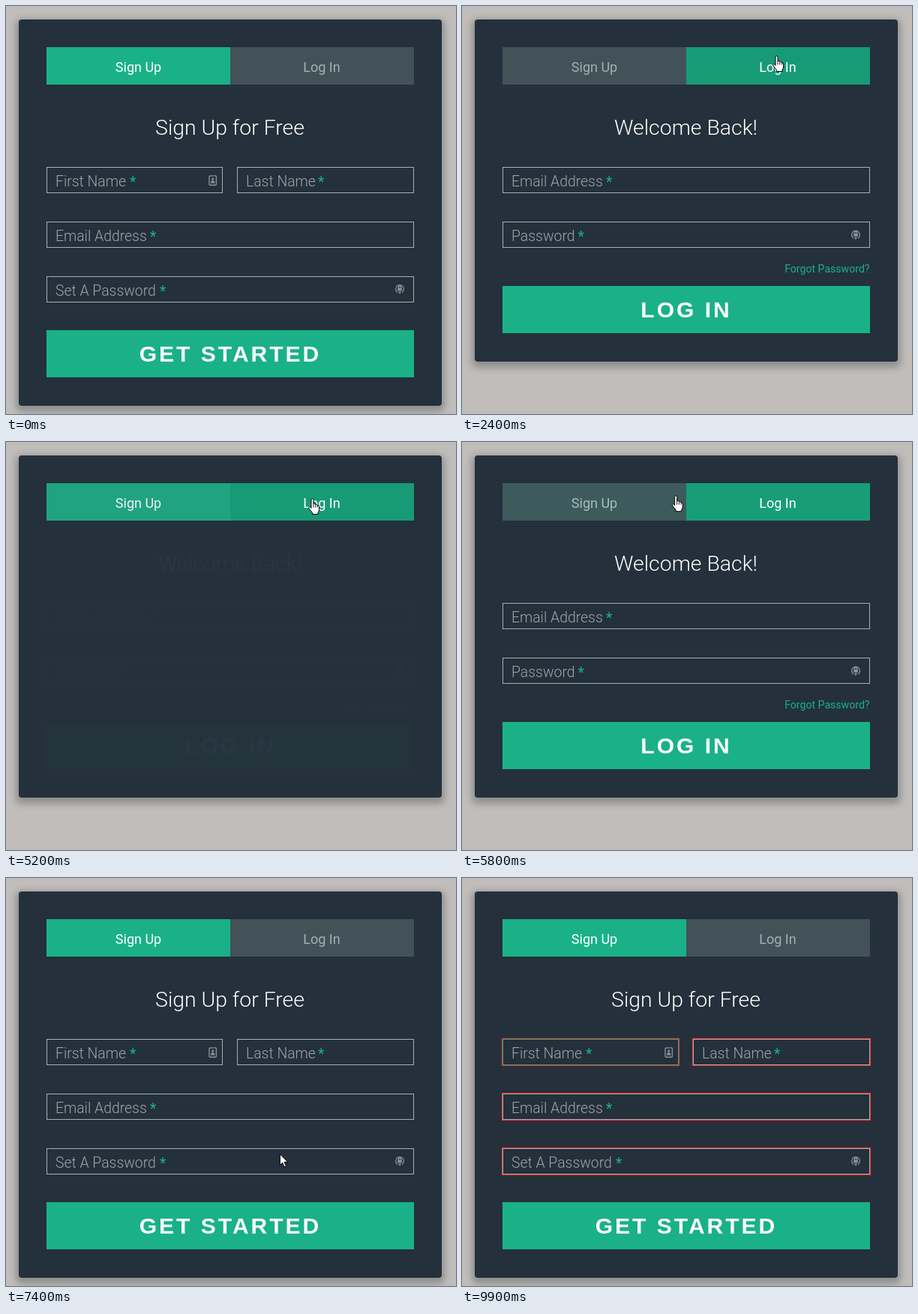
Animation, 600 px wide and 545 px high, one loop 10000 ms. Source, as an HTML page:

```html
<!DOCTYPE html>
<html lang="en">
<head>
<meta charset="utf-8">
<title>Sign up / log in form</title>
<style>
  html, body { margin: 0; width: 100%; height: 100%; overflow: hidden; background: #c1bdba; }
  #card {
    position: absolute; left: 17px; top: 18px; width: 564px; height: 516px;
    border-radius: 4px; background: #24303b;
    box-shadow: 0 4px 10px 4px rgba(19, 35, 47, .3);
  }
  svg { position: absolute; left: 0; top: 0; width: 600px; height: 545px; }
  text { font-family: Roboto, sans-serif; white-space: pre; }
  .mid { text-anchor: middle; }
  .tab { font-size: 18px; }
  .title { font-size: 28.4px; font-weight: 300; fill: #fff; }
  .label { font-size: 19.4px; font-weight: 300; fill: rgba(255, 255, 255, .56); }
  .star { font-size: 19.4px; fill: #1ab188; }
  .box { fill: none; stroke: #a0b3b0; }
  .glow { fill: none; stroke: #e83535; }
  .halo { fill: none; stroke: #f00; stroke-opacity: .2; }
  .btn { font: bold 30px "Liberation Sans", Arial, sans-serif; letter-spacing: 3px; fill: #fff; }
  .link { font-size: 14.1px; fill: #1ab188; text-anchor: end; }
  .tip { font: 10.7px "Open Sans", sans-serif; fill: #000; }
  .icon { fill: none; stroke: #87919a; stroke-width: 1.4; }
  .icon .solid { fill: #87919a; stroke: none; }
  .cursor { fill: #fff; stroke: #000; stroke-linejoin: round; }
</style>
</head>
<body>
<div id="card"></div>
<svg viewBox="0 0 600 545">
  <defs>
    <g id="lock" class="icon">
      <path d="M-3 5.2A5.4 5.4 0 1 1 3 5.2M-1.5 -1V-2.2A1.5 1.5 0 0 1 1.5 -2.2V-1"/>
      <path class="solid" d="M-2.8 -1.2H2.8V3H-2.8ZM-2 4H2L0 7.4Z"/>
    </g>
  </defs>
  <rect id="signBg" x="54" y="55" width="245" height="50"/>
  <rect id="logBg" x="299" y="55" width="245" height="50"/>
  <text id="signText" class="tab mid" x="176.5" y="87.5">Sign Up</text>
  <text id="logText" class="tab mid" x="421" y="87.5">Log In</text>

  <g id="signup">
    <text class="title mid" x="298.5" y="172">Sign Up for Free</text>
    <g id="signFields"></g>
    <g class="icon" transform="translate(270 226)">
      <rect x="1" y=".9" width="9.4" height="12.4" rx="1"/>
      <circle class="solid" cx="5.7" cy="5.1" r="1.7"/>
      <path class="solid" d="M3 9.4Q3 7.2 5.7 7.2T8.4 9.4V10.8H3Z"/>
    </g>
    <use href="#lock" x="525" y="377.5"/>
    <rect id="signBtn" x="54" y="433" width="490" height="63"/>
    <text class="btn mid" x="299" y="474.5">GET STARTED</text>
  </g>

  <g id="login">
    <text class="title mid" x="298.5" y="172">Welcome Back!</text>
    <g id="logFields"></g>
    <use href="#lock" x="525" y="305"/>
    <text class="link" x="543.5" y="356">Forgot Password?</text>
    <rect x="54" y="374" width="490" height="63" fill="#1ab188"/>
    <text class="btn mid" x="299" y="415.5">LOG IN</text>
  </g>

  <g id="tip">
    <path fill="#fff" d="M39 258H46L54 250.5L62 258H183V298H39Z"/>
    <text class="tip" x="54" y="281">Please fill out this field.</text>
  </g>

  <g id="hand" class="cursor">
    <path d="M-1.5 2.2Q-1.5 .6 0 .6T1.5 2.2V8Q1.9 7.2 3.1 7.4T4.3 8.8Q4.9 8 5.9 8.4T6.9 9.8Q9.1 9.2 9.1 11.5V15Q8.9 17.5 7.5 19.5V21.5H0V19.5Q-2.5 16.5 -4.5 13.6Q-5.3 12 -4.1 11.6Q-2.7 11.4 -1.5 13.4Z"/>
    <path d="M1.5 8V12.5M4.3 9V12.5M6.9 10V12.5" stroke-width=".9"/>
  </g>
  <path id="arrow" class="cursor" d="M.5 .5V15.2L3.9 12L6.2 17.5L8.6 16.5L6.3 11.2H11Z"/>
</svg>
<script>
const $ = id => document.getElementById(id);
const LOOP = 10000, STEP = 100;
const IDLE = [67, 81, 89], ACTIVE = [26, 177, 136], HOVER = [23, 155, 119];
const GREY = [160, 179, 176], WHITE = [255, 255, 255];

// Clicks on the tabs, and the submit that marks the fields
const CLICKS = [[1660, 'login'], [3846, 'signup'], [5135, 'login'], [6170, 'signup']];
const SUBMIT = 8450, TIP_END = 9400;

// Each entry: start of a half-second colour transition, new colour
const signTab = [[-999, ACTIVE], [1660, IDLE], [2780, HOVER], [4660, ACTIVE],
                 [5135, IDLE], [5740, HOVER], [6850, ACTIVE]];
const logTab = [[-999, IDLE], [560, HOVER], [2780, ACTIVE], [3846, IDLE],
                [4660, HOVER], [5740, ACTIVE], [6170, IDLE]];
const button = [[-999, ACTIVE], [7840, HOVER], [9300, ACTIVE]];

// Pointer tip: time, x, y
const path = [[100, 590, 190], [560, 475, 92], [1200, 419.5, 66], [2600, 419.5, 66],
  [3300, 209.5, 59], [4400, 209.5, 59], [5000, 408.5, 75], [5450, 408.5, 75],
  [6050, 212.5, 69], [6700, 212.5, 69], [7600, 385, 408], [7800, 385, 408],
  [8100, 357, 470], [9150, 357, 470], [9500, 340, 560]];

const clamp = v => Math.max(0, Math.min(1, v));
const mix = (a, b, k) => a + (b - a) * k;
const swing = k => .5 - Math.cos(Math.PI * clamp(k)) / 2;

// CSS "ease": cubic-bezier(.25, .1, .25, 1)
function ease(x) {
  let lo = 0, hi = 1, s = .5;
  for (let i = 0; i < 20; i++) {
    s = (lo + hi) / 2;
    const bx = .75 * s * (1 - s) + s ** 3;
    if (bx < x) lo = s; else hi = s;
  }
  return .3 * s * (1 - s) ** 2 + 3 * s * s * (1 - s) + s ** 3;
}

function colour(track, t, map = c => c) {
  let c = map(track[0][1]);
  for (const [at, next] of track.slice(1)) {
    if (t < at) break;
    const k = ease(clamp((t - at) / 500)), to = map(next);
    c = c.map((v, i) => mix(v, to[i], k));
  }
  return `rgb(${c.map(Math.round)})`;
}
const ink = c => c === IDLE ? GREY : WHITE;

function pointer(t) {
  const i = path.findIndex(p => p[0] >= t);
  if (i < 1) return [-50, -50];
  const a = path[i - 1], b = path[i], k = swing((t - a[0]) / (b[0] - a[0]));
  return [mix(a[1], b[1], k), mix(a[2], b[2], k)];
}

function field(x, y, w, label, starX) {
  const rect = (cls, d) => `<rect class="${cls}" x="${x + .5 - d}" y="${y + .5 - d}"
    width="${w - 1 + 2 * d}" height="${34 + 2 * d}"/>`;
  return `<g class="warn">${rect('halo', 2)}${rect('glow', 1)}</g>${rect('box', 0)}
    <text class="label" x="${x + 12}" y="${y + 26}">${label}</text>
    <text class="star" x="${starX}" y="${y + 27}">*</text>`;
}

$('signFields').innerHTML = field(54, 215, 235, 'First Name', 165) +
  field(308, 215, 236, 'Last Name', 416) +
  field(54, 288, 490, 'Email Address', 192) +
  field(54, 361, 490, 'Set A Password', 205);
$('logFields').innerHTML = field(54, 215, 490, 'Email Address', 192) +
  field(54, 288, 490, 'Password', 154.5);

const warns = document.querySelectorAll('.warn');
const firstBox = document.querySelector('#signFields .box');
const show = (el, on) => { el.style.display = on ? '' : 'none'; };

function draw(t) {
  let at = -999, form = 'signup';
  for (const [time, name] of CLICKS) if (t >= time) [at, form] = [time, name];
  for (const id of ['signup', 'login']) {
    show($(id), id === form);
    $(id).style.opacity = swing((t - at) / 600);
  }
  $('card').style.height = (form === 'signup' ? 516 : 457) + 'px';

  $('signBg').style.fill = colour(signTab, t);
  $('logBg').style.fill = colour(logTab, t);
  $('signText').style.fill = colour(signTab, t, ink);
  $('logText').style.fill = colour(logTab, t, ink);
  $('signBtn').style.fill = colour(button, t);

  const sent = t >= SUBMIT;
  warns.forEach(w => show(w, sent));
  firstBox.style.stroke = colour([[-999, GREY], [SUBMIT, ACTIVE]], t);
  show($('tip'), sent && t < TIP_END);
  $('tip').style.opacity = clamp((t - SUBMIT) / 120);

  const [x, y] = pointer(t);
  const onTab = x > 54 && x < 544 && y > 55 && y < 105;
  for (const [id, on] of [['hand', onTab], ['arrow', !onTab]]) {
    show($(id), on);
    $(id).setAttribute('transform', `translate(${x} ${y})`);
  }
}

const start = performance.now();
function tick() {
  const t = (performance.now() - start) % LOOP;
  draw(Math.floor(t / STEP) * STEP);
  requestAnimationFrame(tick);
}
tick();
</script>
</body>
</html>
```
